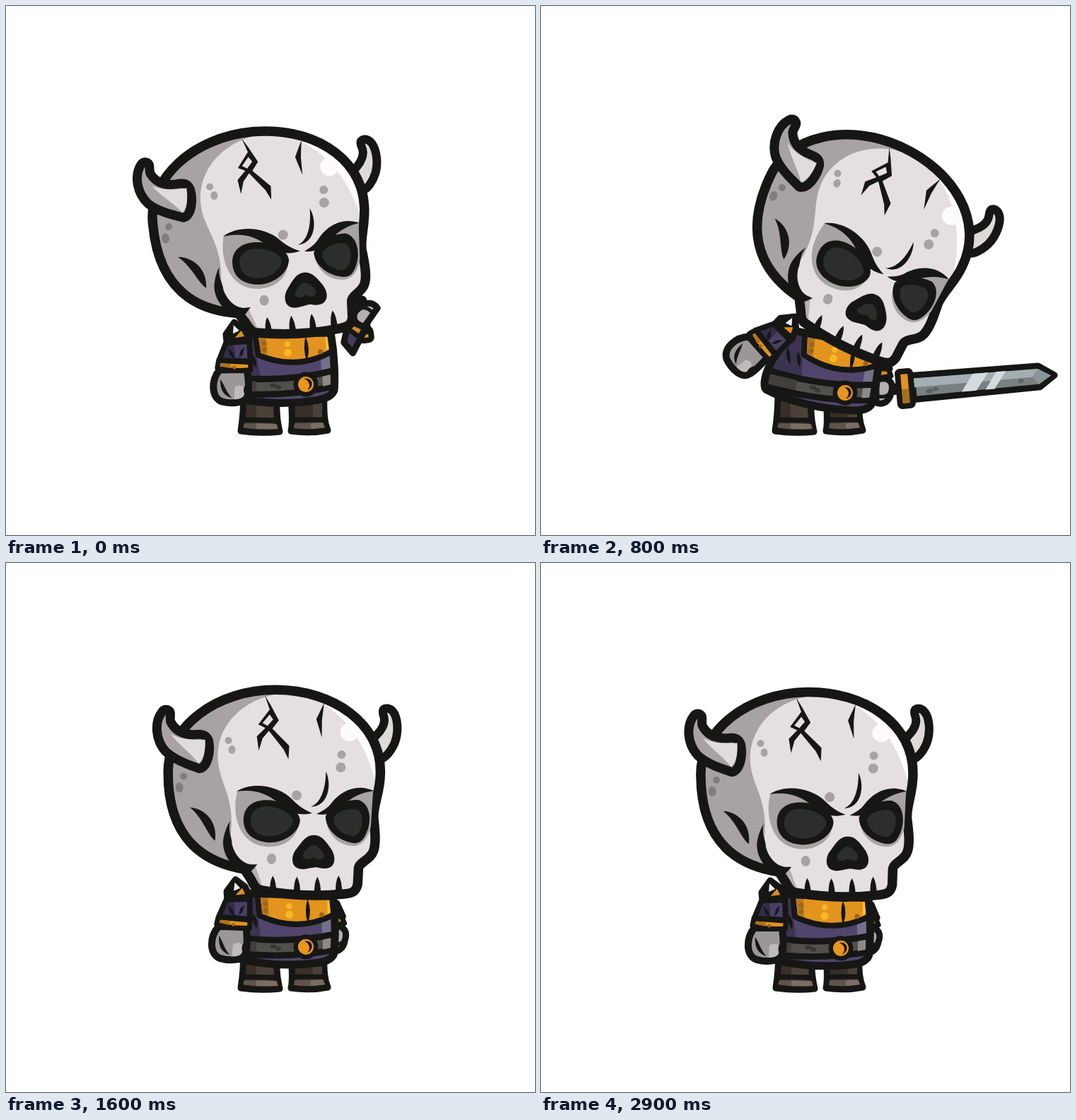
An HTML page for the animation above (3000 ms loop, 748x748 px).

```html
<!DOCTYPE html>
<html lang="en">
<head>
<meta charset="utf-8">
<title>Horned skull warrior</title>
<style>
html, body { margin: 0; width: 100%; height: 100%; overflow: hidden; background: #fff; }
svg { display: block; width: 100vw; height: 100vh; }
.o { stroke: #161715; stroke-linejoin: round; stroke-linecap: round; }
.k { fill: #161715; }
.s { fill: #a8a2a2; }
.d { fill: #2b2e2c; }
</style>
</head>
<body>
<svg viewBox="0 0 748 748">
  <defs>
    <path id="skullShape" d="M228 300C226 235 296 182 380 182C460 182 530 228 528 300C528 325 518 345 519 362C521 380 523 398 519 409C515 422 499 424 498 434L497 456C495 466 490 469 478 470C440 474 400 473 358 465C350 462 348 452 344 447L337 436C300 430 228 410 228 300Z"/>
    <path id="torsoShape" d="M340 468C330 485 314 510 310 533Q307 552 313 556C345 568 395 573 440 568C455 566 464 560 464 552C466 530 466 500 463 474Z"/>
    <clipPath id="skullClip"><use href="#skullShape"/></clipPath>
    <clipPath id="torsoClip"><use href="#torsoShape"/></clipPath>
  </defs>

  <g id="trail">
    <path fill="#b0aaa8" d="M572 224C658 246 737 345 737 458Q737 495 728 524H524L562 435Z"/>
    <path fill="#95939a" d="M562 224C645 250 706 350 707 445Q708 488 702 524H524L562 435Z"/>
    <path fill="#7a7d7a" d="M615 330C640 365 646 405 645 440Q643 485 632 524H524Q550 470 562 435Z"/>
  </g>

  <g id="sword">
    <g class="o">
      <rect x="-38" y="-8" width="16" height="15" rx="4" fill="#d99a28" stroke-width="8"/>
      <path d="M-22 0H18" fill="none" stroke-width="16"/>
    </g>
    <g id="blade">
      <path class="o" fill="#798080" stroke-width="9" d="M40-17L219-15L241 0L219 15L40 17Z"/>
      <path fill="#a3aeb2" d="M42-13L218-11L236 0H42Z"/>
      <path fill="#8b9597" d="M218-11L236 0L218 11L209 0Z"/>
      <path fill="#d3dbdf" d="M126-12H148L129 12H108ZM159-12H173L155 12H142Z"/>
      <g fill="#5c6363"><ellipse cx="63" cy="7" rx="5" ry="3.5"/><ellipse cx="72" cy="5" rx="4" ry="3"/><ellipse cx="193" cy="4" rx="4" ry="3"/></g>
      <rect class="o" x="20" y="-24" width="18" height="49" rx="3" fill="#e3941f" stroke-width="8"/>
      <path fill="#a5701f" d="M24 1H34V21H24Z"/>
    </g>
  </g>

  <g id="armR" class="o">
    <path fill="#463c60" stroke-width="9" d="M448 478L467 483L475 502L452 508Z"/>
    <path fill="#b4b0af" stroke-width="9" d="M456 518C474 511 482 522 477 536C475 547 467 554 456 550Z"/>
    <path fill="none" stroke-width="5" d="M460 541Q470 543 476 536"/>
    <path fill="#d18a20" stroke-width="7" d="M453 502L473 502L477 512L455 516Z"/>
  </g>

  <g id="legL">
    <path class="o" fill="#382f28" stroke-width="9" d="M336 545H383C382 578 384 588 387 602Q360 605 332 601C334 588 336 575 336 545Z"/>
    <path fill="#4a4138" d="M354 560H378V582H354Z"/>
    <path fill="#5f534d" d="M337 590L383 591L385 598Q360 600 335 596Z"/>
    <path fill="#7b6c64" d="M354 590L382 591L384 598L354 598Z"/>
    <path class="o" stroke-width="7" fill="none" d="M336 585L384 586"/>
  </g>
  <g id="legR">
    <path class="o" fill="#382f28" stroke-width="9" d="M403 545H450C449 580 451 590 455 600Q430 605 403 601C406 588 404 578 403 545Z"/>
    <path fill="#4a4138" d="M434 560H447V582H434Z"/>
    <path fill="#5f534d" d="M408 590L448 589L451 596Q430 600 407 597Z"/>
    <path fill="#7b6c64" d="M431 590L448 589L451 596L431 598Z"/>
    <path class="o" stroke-width="7" fill="none" d="M406 585L449 585"/>
  </g>

  <g id="torso">
    <use href="#torsoShape" fill="#51456c"/>
    <g clip-path="url(#torsoClip)">
      <path fill="#3b3350" d="M300 460H352L366 580H300Z"/>
      <path fill="#75708a" d="M447 505H460V530H447Z"/>
      <path class="k" d="M334 492Q332 505 341 516Q342 502 334 492ZM350 497Q347 508 355 518Q358 506 350 497Z"/>
      <path class="o" fill="#52504d" stroke-width="9" d="M300 526C345 535 405 540 468 527V549C405 561 345 557 300 549Z"/>
      <path fill="#403f3c" d="M304 532L354 537V551L304 547Z"/>
      <path fill="#8d8a88" d="M448 535L459 533V547L448 549Z"/>
      <g fill="#3a3835"><ellipse cx="378" cy="544" rx="5" ry="3"/><ellipse cx="385" cy="547" rx="4" ry="3"/></g>
      <path class="o" fill="#e3941f" stroke-width="8" d="M356 468L359 500Q412 526 464 500V468Z"/>
      <path fill="#b5761d" d="M360 472H371L372 501L363 498Z"/>
      <path fill="#f8c12c" d="M455 476H460V496L455 499Z"/>
    </g>
    <use href="#torsoShape" class="o" fill="none" stroke-width="11"/>
    <path class="k" d="M427 477Q434 495 427 512Q422 495 427 477Z"/>
    <g fill="#f8b823"><circle cx="401" cy="487" r="4"/><circle cx="401" cy="499" r="5.5"/></g>
    <g fill="#9c651c"><circle cx="368" cy="484" r="3.5"/><circle cx="368" cy="493" r="3.5"/><circle cx="447" cy="500" r="3.5"/></g>
    <circle class="k" cx="424" cy="545" r="17.5"/>
    <circle cx="424" cy="545" r="11" fill="#e8961e"/>
    <path class="k" d="M422 537C435 535 436 550 426 553C431 548 430 541 422 537Z"/>
  </g>

  <g id="armL">
    <path class="o" fill="#dc8f20" stroke-width="9" d="M312 466L324 449L338 459L345 473L313 477Z"/>
    <path class="k" d="M312 472L324 448L336 458L323 473Z"/>
    <path fill="#f3f0ef" d="M323 453L331 461L322 465Z"/>
    <path class="o" fill="#9b9797" stroke-width="10" d="M302 516C290 530 289 555 305 561C320 565 340 564 342 549C344 538 342 525 341 516Z"/>
    <path fill="#bfbbba" d="M323 541C332 535 338 540 337 548C337 556 330 558 322 558Z"/>
    <path class="k" d="M303 529C302 545 308 553 319 556C311 548 309 538 303 529ZM343 534C335 539 334 547 338 553L345 553Z"/>
    <path class="o" fill="#4a3f66" stroke-width="8" d="M312 478L345 476L346 505L302 502Z"/>
    <path fill="#332c48" d="M314 482L323 481L325 500L307 499Z"/>
    <path class="k" d="M314 485L321 492L324 500L318 497ZM338 484L332 490L330 499L335 495Z"/>
    <path class="o" fill="#e3941f" stroke-width="7" d="M301 503L346 506V517Q320 519 299 513Z"/>
    <path fill="#b0721d" d="M304 507L318 508V514L304 511Z"/>
    <circle cx="323" cy="513" r="2.5" fill="#9c651c"/>
  </g>

  <g id="head">
    <path class="o" fill="#dedad8" stroke-width="12" d="M531 212C531 207 536 206 541 208C553 215 554 240 548 256C543 268 535 277 528 279L514 252C524 245 532 235 533 226C534 220 531 217 531 212Z"/>
    <use href="#skullShape" class="s"/>
    <g clip-path="url(#skullClip)">
      <path fill="#e5e0df" d="M395 186C330 192 298 235 298 275C298 310 319 328 318 372L316 405L330 425L352 432L365 480H560V180Z"/>
      <path fill="#fdfcfa" d="M412 187C466 202 504 244 521 312H545V170H412Z"/>
      <circle cx="484" cy="241" r="13" fill="#fdfcfa"/>
      <path fill="#b5afae" d="M335 431H352L366 470H350Z"/>
    </g>
    <use href="#skullShape" class="o" fill="none" stroke-width="13.5"/>
    <path class="o s" stroke-width="13" d="M219 214C208 228 209 253 224 270C238 283 258 289 272 294C284 292 288 270 285 255C282 246 276 245 266 246C246 247 236 238 231 228C229 222 233 215 228 212C225 210 221 211 219 214Z"/>
    <path fill="#e0dcdb" d="M231 245C246 254 265 254 280 253C281 268 278 280 271 287C262 274 244 262 231 245Z"/>

    <path class="k" d="M364 190L372 203L384 225L375 237L399 261L398 280L391 266L370 240L361 251L356 268L353 248L365 236L355 231L371 210Z"/>
    <path fill="#e5e0df" d="M371 217L376 224L368 233L361 229Z"/>
    <path class="k" d="M448 200L437 223L445 249L445 224Z"/>
    <g class="s">
      <circle cx="313" cy="254" r="5"/><ellipse cx="318" cy="267" rx="5" ry="6"/>
      <circle cx="473" cy="273" r="6"/><circle cx="472" cy="291" r="7"/>
      <circle cx="410" cy="331" r="7"/><ellipse cx="375" cy="421" rx="6.5" ry="7.5"/>
    </g>
    <g fill="#827d7d"><circle cx="250" cy="305" r="5"/><ellipse cx="244" cy="321" rx="5.5" ry="7"/></g>
    <path class="k" d="M259 349C278 350 299 367 295 396C284 388 278 364 259 349Z"/>
    <path class="k" d="M316 368C313 384 319 390 319 401C323 416 333 427 345 429H355L344 441L328 436C311 425 304 406 307 391C309 382 312 374 316 368Z"/>

    <g class="s">
      <path d="M326 326C317 360 330 404 372 404C395 404 412 390 414 368C405 342 370 316 326 326Z"/>
      <path d="M518 323C498 316 470 332 452 358C450 385 470 402 490 402C502 402 511 392 515 375Z"/>
    </g>
    <path class="k" d="M325 326C346 312 384 316 405 338C413 346 420 351 432 356C412 361 398 354 385 343C370 329 350 322 325 326Z"/>
    <path class="k" d="M519 324C495 313 472 324 458 343C452 350 446 353 438 357C452 360 462 355 470 349C485 335 500 326 519 324Z"/>
    <path class="k" d="M335 366C335 345 352 337 370 338C392 339 415 352 415 367C413 385 392 398 372 398C350 397 335 386 335 366Z"/>
    <path class="d" d="M345 366C346 352 357 346 371 347C389 349 404 358 405 367C403 380 388 389 372 389C355 389 345 380 345 366Z"/>
    <path class="k" d="M451 360C460 345 478 336 498 337C513 342 516 362 511 378C506 393 500 399 490 398C470 395 451 380 451 360Z"/>
    <path class="d" d="M462 363C467 354 479 349 495 350C504 355 504 366 502 374C499 384 494 389 487 388C473 385 463 376 462 363Z"/>
    <path class="k" d="M451 297C460 315 455 347 430 347C444 342 451 322 451 297Z"/>
    <path class="k" d="M434 387C445 386 452 396 459 406C468 420 464 433 452 434C445 435 440 431 434 433C426 434 420 437 412 434C402 430 403 415 410 407C418 396 424 387 434 387Z"/>
    <path class="d" d="M434 401C442 402 450 412 449 418C446 424 438 421 434 418C430 422 421 423 419 417C420 411 428 402 434 401Z"/>
    <g id="teeth" class="k"></g>
  </g>
</svg>
<script>
const el = id => document.getElementById(id);
const step = 100, frames = 30, attackEnd = 12;

el("teeth").innerHTML = [[377, 445], [411, 446], [440, 446], [470, 444]].map(([x, y]) =>
  `<path d="M${x} ${y}q5 8 5 25h-9q-1-17 4-25Z"/>`).join("");

// head x, y, angle | torso | left arm | right arm | sword angle, left foot shift
const windup = [423, 402, -5.2, 424, 535, -3, 334, 466, -1, 483, 477, -145, -98, 0];
const strike = [468, 434, 28.4, 429, 547, 9, 357, 460, 54, 481, 496, 0, -2.4, -8];
const settle = [463, 431, 24.8, 430, 547, 8, 352, 460, 48, 480, 496, 0, -5, -1];
const rest = [434, 412, 0, 424, 545, 0, 335, 468, 0, 462, 485, 0, -45, 0];
const swing = [0, 0.06, 0.25, 0.68, 1];

const mix = (a, b, k) => a.map((v, i) => v + (b[i] - v) * k);
const smooth = k => k * k * (3 - 2 * k);

function attack(n) {
  if (n <= 4) return mix(windup, strike, swing[n]);
  if (n <= 8) return mix(strike, settle, smooth(Math.max(0, n - 6) / 2));
  return mix(settle, rest, smooth((n - 8) / 4));
}

function idle(n) {
  const turn = 2 * Math.PI / (frames - attackEnd);
  const b = (1 - Math.cos((n - attackEnd) * turn)) / 2;
  const a = -1.4 + 2.1 * Math.cos((n - 14.4) * turn);
  const shift = [1.4 * a, -5.5 * b, a, 0, -5.5 * b, -1.5 * b,
    0, -3 * b, 4 * b, 2 * b, -5 * b, -4 * b, 0, 0];
  return rest.map((v, i) => v + shift[i]);
}

function place(id, x, y, angle, px, py) {
  el(id).setAttribute("transform", `translate(${x} ${y}) rotate(${angle}) translate(${-px} ${-py})`);
}

const show = (id, on) => el(id).setAttribute("visibility", on ? "visible" : "hidden");

function draw(n) {
  const p = n < attackEnd ? attack(n) : idle(n);
  place("head", p[0], p[1], p[2], 434, 412);
  place("torso", p[3], p[4], p[5], 424, 545);
  place("armL", p[6], p[7], p[8], 335, 468);
  place("armR", p[9], p[10], p[11], 462, 485);
  place("legL", p[13], 0, 0, 0, 0);

  const r = p[11] * Math.PI / 180, c = Math.cos(r), s = Math.sin(r);
  place("sword", p[9] + 6 * c - 47 * s, p[10] + 6 * s + 47 * c, p[12], 0, 0);
  show("sword", n < attackEnd);
  show("blade", n > 0 && n < attackEnd);

  show("trail", n >= 3 && n <= 5);
  el("trail").setAttribute("opacity", n === 5 ? 0.45 : 1);
  place("trail", 488, 543, p[12] - strike[12], 488, 543);
}

let last = -1;
const start = performance.now();
function tick() {
  const n = Math.floor(Math.max(0, performance.now() - start) / step) % frames;
  if (n !== last) draw(last = n);
  requestAnimationFrame(tick);
}
tick();
</script>
</body>
</html>
```
